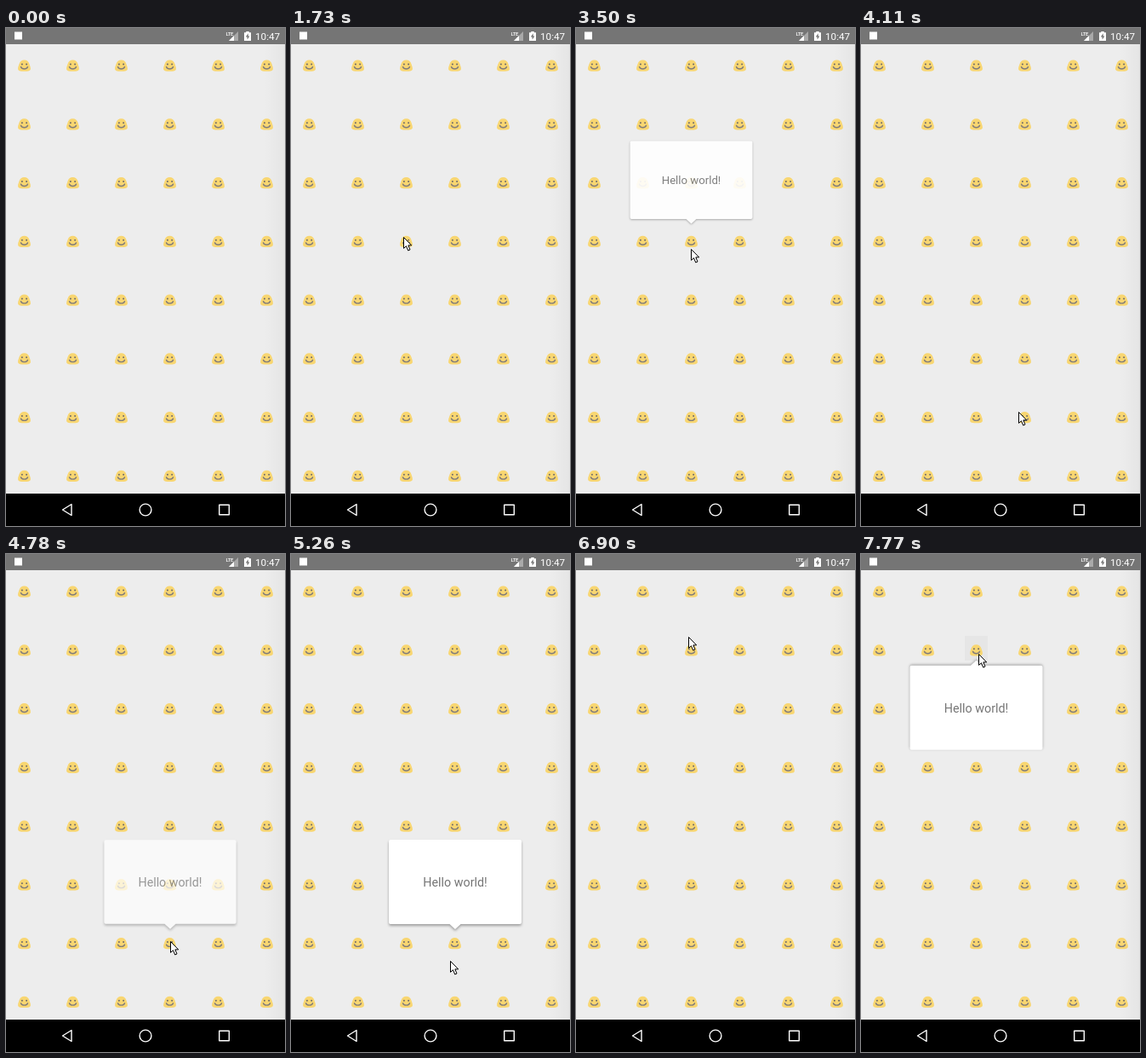
Animation of 328x584 px, one loop 8 s. Source, as an HTML page:

```html
<!DOCTYPE html>
<html lang="en">
<head>
<meta charset="utf-8">
<title>Popup bubbles</title>
<style>
  html, body { margin: 0; width: 100%; height: 100%; overflow: hidden; background: #ededed; }
  svg { display: block; width: 100%; height: 100%; }
  text { font-family: Roboto, sans-serif; }
</style>
</head>
<body>
<svg viewBox="0 0 328 584">
  <defs>
    <linearGradient id="edge">
      <stop offset="0" stop-opacity="0"/>
      <stop offset="1" stop-opacity=".035"/>
    </linearGradient>
    <g id="smiley">
      <path fill="#f8d671" d="M-7.4 3.6C-7.4 1-6.4-.5-6-2C-5.2-5-3-6.8 0-6.8S5.2-5 6-2C6.4-.5 7.4 1 7.4 3.6C7.4 5.8 5 6.4 0 6.4S-7.4 5.8-7.4 3.6Z"/>
      <g fill="#6e6a68"><circle cx="-2.6" cy="-1.8" r="1"/><circle cx="2.6" cy="-1.8" r="1"/></g>
      <path fill="none" stroke="#817c7a" stroke-width="1.4" stroke-linecap="round" d="M-4 1.3C-2.6 4.4 2.6 4.4 4 1.3"/>
    </g>
  </defs>

  <rect width="328" height="584" fill="#ededed"/>
  <rect x="304" y="19" width="24" height="527" fill="url(#edge)"/>
  <rect id="pressed" x="122" y="96" width="27" height="29" fill="#e6e6e6"/>
  <g id="grid"></g>

  <!-- status bar -->
  <rect width="328" height="19" fill="#757575"/>
  <rect x="10" y="4.5" width="9" height="9" fill="#fff"/>
  <path fill="#a9a9a9" d="M273 4V15H262Z"/>
  <path fill="#fff" d="M268 9V15H262Z"/>
  <text x="258.5" y="9" font-size="6" font-weight="500" fill="#fff" letter-spacing="-.4">LTE</text>
  <path fill="#fff" d="M280 5.2H282.3V4H285.7V5.2H288V15H280Z"/>
  <path fill="#757575" d="M284.7 6.2L281.8 10.6H283.6V13.8L286.4 9.4H284.7Z"/>
  <text x="293" y="14" font-size="11.7" fill="#fff">10:47</text>

  <!-- navigation bar -->
  <rect y="546" width="328" height="38" fill="#000"/>
  <g fill="none" stroke="#fff" stroke-width="1.4" stroke-linejoin="round">
    <path d="M77 558.5V571.5L66.5 565Z"/>
    <circle cx="164" cy="565" r="6.9"/>
    <rect x="250.7" y="559.2" width="11.6" height="11.6"/>
  </g>

  <g id="popups"></g>
  <path id="cursor" fill="#fff" stroke="#000" d="M.5 .5V13.4L3.5 10.7L5.7 16L8 15L5.8 9.9H9.7Z"/>
</svg>
<script>
const LOOP = 8000;
const byId = id => document.getElementById(id);
const clamp = v => Math.min(1, Math.max(0, v));
const smooth = u => u * u * (3 - 2 * u);

let cells = '';
for (let row = 0; row < 8; row++)
  for (let col = 0; col < 6; col++)
    cells += `<use href="#smiley" x="${21.5 + 57 * col}" y="${44.3 + 68.75 * row}"/>`;
byId('grid').innerHTML = cells;

// arrow: 1 points down, -1 points up; depth: shadow offset
const popups = [
  { x: 135.5, y: 178, arrow: 1, depth: 1, show: 2040, shown: 2280, hide: 3500 },
  { x: 193, y: 384.5, arrow: 1, depth: 2, show: 4700, shown: 4920, hide: 5920 },
  { x: 135.5, y: 180.3, arrow: -1, depth: 1, show: 7590, shown: 7770, hide: LOOP }
];
byId('popups').innerHTML = popups.map(p => `<g>
  <path fill="#fff" transform="scale(1 ${p.arrow})"
    style="filter: drop-shadow(0 ${p.depth}px ${p.depth * .4 + 1}px rgba(0,0,0,.33))"
    d="M-76-49.5H76Q78-49.5 78-47.5V47.5Q78 49.5 76 49.5H6.5L0 55.5L-6.5 49.5H-76Q-78 49.5-78 47.5V-47.5Q-78-49.5-76-49.5Z"/>
  <text y="5.6" text-anchor="middle" font-size="14.3" fill="#757575">Hello world!</text></g>`).join('');
popups.forEach((p, i) => p.node = byId('popups').children[i]);

// cursor stops: time, x, y
const stops = [
  [1190, 6, 394], [1730, 132, 245], [2600, 132, 245], [2850, 135, 259],
  [3600, 135, 259], [4110, 185, 450], [4200, 185, 450], [4280, 191, 451],
  [4300, 191, 451], [4400, 193, 454], [4920, 193, 454], [5260, 187, 477],
  [6130, 187, 477], [6520, 146, 0], [6700, 137, 41], [6900, 132, 97],
  [7040, 132, 97], [7270, 137, 112], [7580, 137, 112], [7640, 138, 117], [LOOP, 138, 117]
];

function drawCursor(t) {
  byId('cursor').style.display = t < 1210 ? 'none' : '';
  const next = Math.max(1, stops.findIndex(s => s[0] > t));
  const [t0, x0, y0] = stops[next - 1], [t1, x1, y1] = stops[next];
  const k = smooth(clamp((t - t0) / (t1 - t0)));
  byId('cursor').setAttribute('transform', `translate(${x0 + (x1 - x0) * k} ${y0 + (y1 - y0) * k})`);
}

function drawPopup(p, t) {
  let scale, alpha;
  if (t < p.hide) {
    const rest = 1 - clamp(.15 + .85 * (t - p.show) / (p.shown - p.show));
    scale = 1 - .1 * rest ** 5;
    alpha = t < p.show ? 0 : 1 - rest ** 2;
  } else {
    const u = clamp(.25 + .75 * (t - p.hide) / 160);
    scale = .9 + .1 * (1 - u) ** 5;
    alpha = 1 - u ** 1.8;
  }
  const pivot = 3 * p.arrow * (1 - scale);
  p.node.setAttribute('transform', `translate(${p.x} ${p.y + pivot}) scale(${scale})`);
  p.node.setAttribute('opacity', alpha);
}

function draw(now) {
  const t = now % LOOP;
  byId('pressed').style.display = t < 7590 ? 'none' : '';
  popups.forEach(p => drawPopup(p, t));
  drawCursor(t);
  requestAnimationFrame(() => draw(performance.now() - start));
}
const start = performance.now();
draw(0);
</script>
</body>
</html>
```
